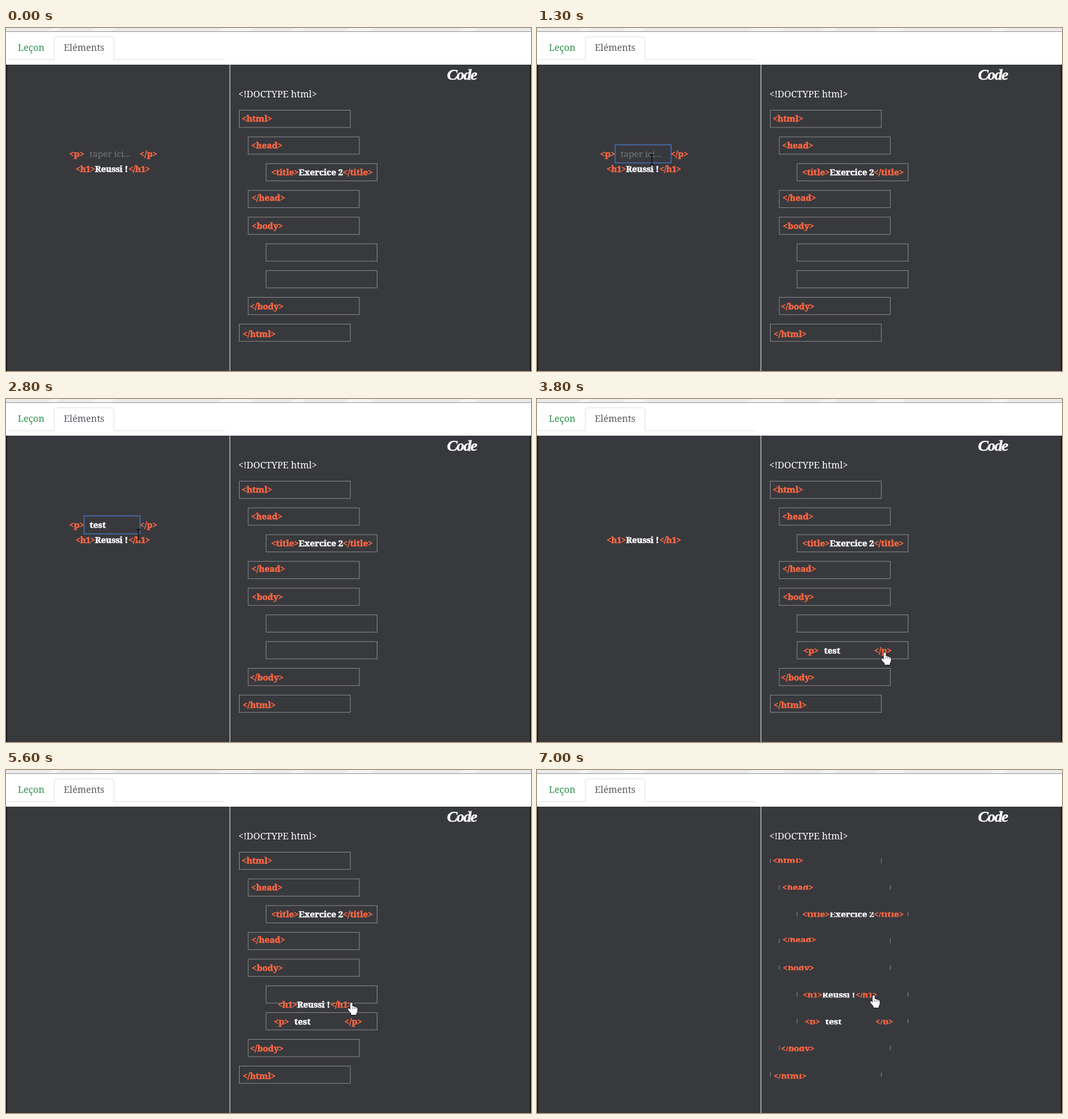
These frames come from a looping animation (800x524 px, 7.1 s). An HTML page with a canvas:

```html
<!DOCTYPE html>
<html lang="fr">
<head>
<meta charset="utf-8">
<title>Exercice HTML</title>
<style>
  html, body { margin: 0; width: 100%; height: 100%; overflow: hidden; background: #38393d; }
  canvas { display: block; }
</style>
</head>
<body>
<canvas id="stage" width="800" height="524"></canvas>
<script>
const ctx = document.getElementById('stage').getContext('2d');
const LOOP = 7100, STEP = 100;
const TAG = '#ff6844', WHITE = '#ffffff';
const REGULAR = '14.1px "Noto Serif", serif';
const SMALL = '13.3px "Noto Serif", serif';
const BOLD = 'bold 13.4px "Noto Serif", serif';
const SCRIPT = 'italic bold 24px "Liberation Serif", serif';

// Cursor path: time, x, y
const PATH = [
  [400, 232, 215], [700, 180, 204], [1000, 175, 202], [2500, 175, 202],
  [2800, 202, 207], [2900, 220, 195], [3000, 220, 195], [3400, 470, 365],
  [3700, 530, 387], [4000, 530, 387], [4300, 455, 350], [4600, 220, 215],
  [4700, 220, 215], [4900, 367, 277], [5000, 391, 283], [5500, 528, 358],
  [6000, 519, 343], [6400, 519, 343], [6900, 513, 344]
];
const FOCUS = 900, HAND = 2900;
const KEYS = [1900, 2100, 2300, 2500];
const DRAG_P = { from: 3000, to: 3900, grab: [220, 195], drop: [312, 192] };
const DRAG_H1 = { from: 4700, to: 6100, grab: [220, 215], drop: [299, 128] };
const HIDE = { from: 6735, length: 400 };

const INDENTS = [0, 1, 3, 1, 1, 3, 3, 1, 0];
const TAGS = [
  ['<html>', 359, 138], ['<head>', 373.5, 179], ['</head>', 374, 259],
  ['<body>', 374.5, 302], ['</body>', 371.5, 425.5], ['</html>', 360.5, 467.5]
];

function cursorAt(t) {
  let i = PATH.findIndex(k => k[0] > t);
  if (i < 0) return PATH[PATH.length - 1].slice(1);
  if (i === 0) return PATH[0].slice(1);
  const [t0, x0, y0] = PATH[i - 1], [t1, x1, y1] = PATH[i];
  const p = (t - t0) / (t1 - t0);
  return [x0 + (x1 - x0) * p, y0 + (y1 - y0) * p];
}

// A dragged element follows the cursor one step late.
function offset(drag, t) {
  if (t < drag.from) return [0, 0];
  if (t >= drag.to) return drag.drop;
  const [x, y] = cursorAt(Math.max(drag.from, t - STEP));
  return [x - drag.grab[0], y - drag.grab[1]];
}

function text(str, x, base, color, font, spacing = 0) {
  ctx.font = font;
  ctx.letterSpacing = spacing + 'px';
  ctx.fillStyle = color;
  ctx.fillText(str, x, base);
}

// Bold text thickened by a thin outline
function heavy(str, x, base, color, font = BOLD, spacing = -0.1) {
  text(str, x, base, color, font, spacing);
  ctx.strokeStyle = color;
  ctx.lineWidth = 0.45;
  ctx.strokeText(str, x, base);
}

function rect(x, y, w, h, color) {
  ctx.fillStyle = color;
  ctx.fillRect(x, y, w, h);
}

function outline(x, y, w, h, color, width = 1) {
  ctx.strokeStyle = color;
  ctx.lineWidth = width;
  ctx.strokeRect(x, y, w, h);
}

// Draws within a band that shrinks towards its middle.
function band(mid, share, draw) {
  ctx.save();
  if (share < 1) {
    ctx.beginPath();
    ctx.rect(0, mid - 13.5 * share, 800, 27 * share);
    ctx.clip();
  }
  draw();
  ctx.restore();
}

function drawHeader() {
  rect(0, 0, 800, 56, WHITE);
  rect(0, 0, 800, 5, '#ebebeb');
  ctx.fillStyle = '#f4f4f4';
  for (const [x, w] of [[62, 22], [128, 40], [322, 58], [432, 26], [515, 48], [690, 30]]) {
    ctx.beginPath();
    ctx.moveTo(x, 5);
    ctx.lineTo(x + 8, 0);
    ctx.lineTo(x + w, 0);
    ctx.lineTo(x + w - 8, 5);
    ctx.fill();
  }
  rect(0, 5, 800, 1, '#9c9c9c');
  rect(2, 48, 71, 1, '#e2e4e6');
  rect(165, 48, 168, 1, '#e2e4e6');
  ctx.strokeStyle = '#dee2e6';
  ctx.lineWidth = 1;
  ctx.beginPath();
  ctx.moveTo(73.5, 48.5);
  ctx.arcTo(73.5, 13.5, 80, 13.5, 4);
  ctx.arcTo(164.5, 13.5, 164.5, 20, 4);
  ctx.lineTo(164.5, 48.5);
  ctx.stroke();
  text('Leçon', 18, 35, '#2c9048', REGULAR);
  text('Eléments', 88, 35, '#54585d', REGULAR);
}

function drawPanels() {
  rect(0, 56, 800, 468, '#38393d');
  rect(340.5, 56, 1.5, 468, '#aeaeb0');
  rect(0, 56, 1.5, 468, '#111114');
  rect(798.5, 56, 1.5, 468, '#111114');
  heavy('Code', 672, 78.5, WHITE, SCRIPT, -1.4);
  text('<!DOCTYPE html>', 354, 105.5, WHITE, REGULAR);
}

function drawRows(share) {
  INDENTS.forEach((indent, i) => {
    const x = 355.5 + 13.6 * indent, y = 125.5 + 40.85 * i;
    band(y + 13, share, () => outline(x, y, 169.2, 26.4, '#818285'));
  });
  for (const [str, x, mid] of TAGS)
    band(mid + 0.5, share, () => heavy(str, x, mid + 4.7, TAG));
  band(221, share, () => {
    heavy('<title>', 404, 225.2, TAG);
    heavy('Exercice 2', 446, 225.2, WHITE, BOLD, -0.2);
    heavy('</title>', 513, 225.2, TAG);
  });
}

function drawParagraph(t, share) {
  const [dx, dy] = offset(DRAG_P, t);
  const typed = 'test'.slice(0, KEYS.filter(k => t >= k).length);
  band(193 + dy, share, () => {
    ctx.translate(dx, dy);
    heavy('<p>', 96, 197.2, TAG);
    heavy('</p>', 203.5, 197.2, TAG);
    if (t >= FOCUS && t < HAND) outline(119, 178.5, 85.3, 27.5, '#4674bd', 1.3);
    if (typed) heavy(typed, 127.5, 197.2, WHITE);
    else text('taper ici...', 127.5, 197.2, '#77787c', SMALL);
  });
}

function drawHeading(t, share) {
  const [dx, dy] = offset(DRAG_H1, t);
  band(216 + dy, share, () => {
    ctx.translate(dx, dy);
    heavy('<h1>', 106, 220.2, TAG, BOLD, -0.5);
    heavy('Reussi !', 135.5, 220.2, WHITE, BOLD, -0.3);
    heavy('</h1>', 186.5, 220.2, TAG, BOLD, -0.5);
  });
}

function drawBeam() {
  ctx.strokeStyle = '#0c0c0e';
  ctx.lineWidth = 1.3;
  ctx.beginPath();
  for (const s of [-1, 1]) {
    ctx.moveTo(-3, 8 * s);
    ctx.quadraticCurveTo(0, 8 * s, 0, 6 * s);
    ctx.quadraticCurveTo(0, 8 * s, 3, 8 * s);
  }
  ctx.moveTo(0, -7);
  ctx.lineTo(0, 7);
  ctx.stroke();
}

function drawHand() {
  const hand = new Path2D('M-1.6 1.4Q0 -1 1.6 1.4V6Q3.3 5 4.4 6.7Q6 6 7 7.5' +
    'Q9.3 7.2 9.3 9.5V13Q9.3 15 7.7 16.5V19H-.2V17L-5 11.4Q-5.6 9.2 -3.7 9.1L-1.6 11Z');
  ctx.lineJoin = 'round';
  ctx.strokeStyle = '#17171a';
  ctx.lineWidth = 1.6;
  ctx.stroke(hand);
  ctx.fillStyle = WHITE;
  ctx.fill(hand);
  ctx.lineWidth = 0.6;
  ctx.beginPath();
  for (const x of [1.7, 4.4, 7]) {
    ctx.moveTo(x, 7.2);
    ctx.lineTo(x, 10);
  }
  ctx.stroke();
}

function drawCursor(t) {
  if (t < PATH[0][0]) return;
  ctx.save();
  ctx.translate(...cursorAt(t));
  if (t < HAND) drawBeam();
  else drawHand();
  ctx.restore();
}

function render(t) {
  const p = Math.min(1, Math.max(0, (t - HIDE.from) / HIDE.length));
  const share = 0.5 + Math.cos(Math.PI * p) / 2;
  ctx.lineJoin = 'miter';
  drawHeader();
  drawPanels();
  drawRows(share);
  drawParagraph(t, share);
  drawHeading(t, share);
  drawCursor(t);
}

const start = performance.now();
function tick() {
  const t = (performance.now() - start) % LOOP;
  render(Math.floor(t / STEP) * STEP);
  requestAnimationFrame(tick);
}
tick();
</script>
</body>
</html>
```
